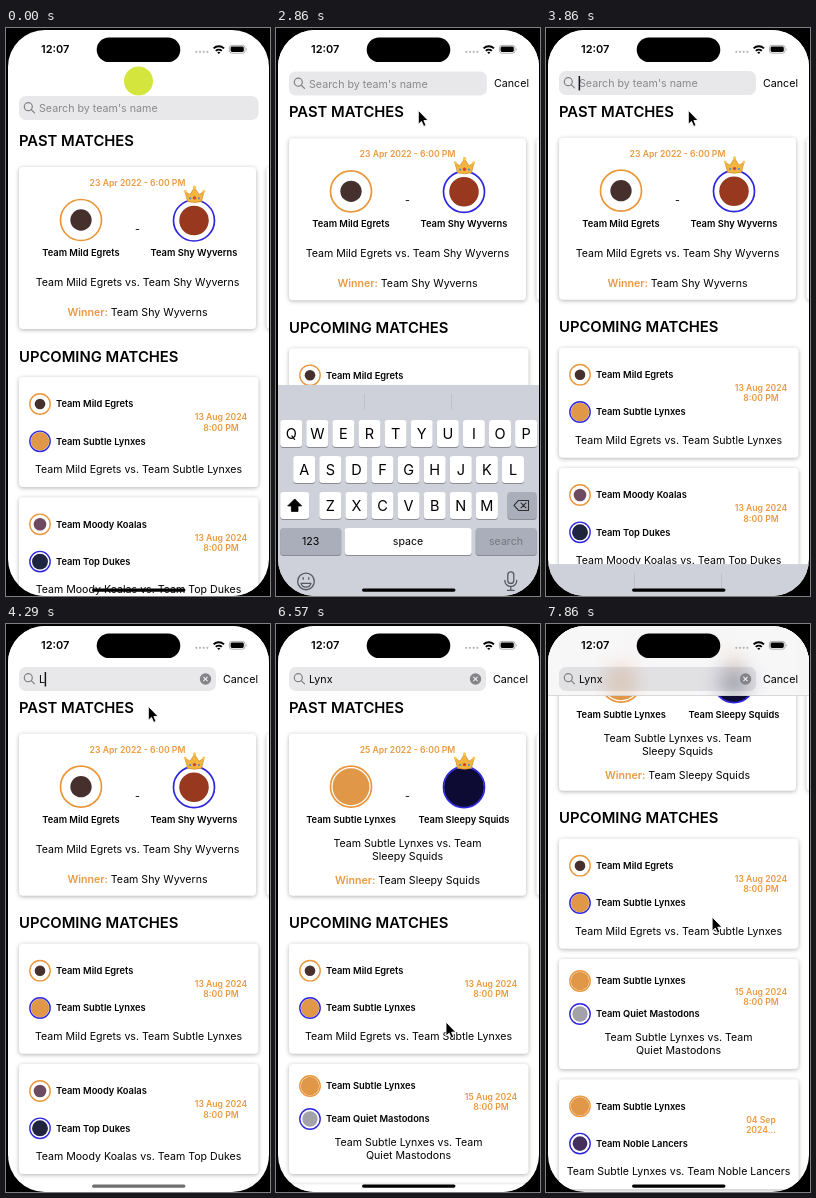
An HTML page for the animation above (8 s loop, 264 px wide and 568 px high).

```html
<!DOCTYPE html>
<html lang="en">
<head>
<meta charset="utf-8">
<title>Match search</title>
<style>
  html, body { margin: 0; width: 100%; height: 100%; overflow: hidden; background: #000; }
  svg { display: block; width: 100%; height: 100%; }
  text { font-family: Inter, Roboto, sans-serif; font-size: 10.6px; fill: #000; white-space: pre; }
  .mid { text-anchor: middle; }
  .title { font-size: 14.8px; font-weight: 600; }
  .name { font-size: 9.3px; font-weight: 600; }
  .date { font-size: 8.63px; font-weight: 600; fill: #ea9a41; }
  .win { font-weight: 600; fill: #ea9a41; }
  .field { font-size: 10.7px; }
  .key { font-size: 14.5px; }
  .card { fill: #fff; filter: drop-shadow(.6px 1.8px 2.3px rgba(0, 0, 0, .3)); }
</style>
</head>
<body>
<svg viewBox="0 0 264 568" preserveAspectRatio="none">
  <defs>
    <clipPath id="screen"><rect x="2" y="2" width="261" height="566" rx="37"/></clipPath>
    <clipPath id="top"><rect width="264" height="72"/></clipPath>
    <filter id="soft" x="-20%" y="-20%" width="140%" height="140%"><feGaussianBlur stdDeviation="8"/></filter>
  </defs>
  <rect width="264" height="568"/>
  <g clip-path="url(#screen)">
    <rect width="264" height="568" fill="#fff"/>
    <g id="list"><g id="all"></g><g id="found"></g></g>
    <g id="header" clip-path="url(#top)">
      <rect width="264" height="72" fill="#fff"/>
      <g id="glass">
        <g filter="url(#soft)"><use href="#list"/></g>
        <rect width="264" height="72" fill="#f5f5f6" opacity=".75"/>
        <rect y="71.5" width="264" height=".5" fill="#bbb"/>
      </g>
    </g>
    <circle id="logo" cx="132.5" cy="53" r="14.5" fill="#d4e53d"/>
    <g id="search">
      <rect id="bar" x="13" y="68" height="24" rx="6.6" fill="#767680" fill-opacity=".17"/>
      <g fill="none" stroke="#808085" stroke-width="1.2" stroke-linecap="round">
        <circle cx="22.3" cy="78.7" r="4"/><path d="M25.3 81.7l3.2 3.2"/>
      </g>
      <text id="hint" class="field" x="33" y="84" style="fill:#88888d">Search by team's name</text>
      <text id="query" class="field" x="33" y="84"></text>
      <rect id="caret" y="73" width="1.5" height="14.5" fill="#15151c"/>
      <g id="clear">
        <circle cx="199.5" cy="80" r="5.7" fill="#838388"/>
        <path d="M197.4 77.9l4.2 4.2m0-4.2l-4.2 4.2" stroke="#f0f0f0" stroke-width="1.1"/>
      </g>
    </g>
    <text id="cancel" class="field" y="59">Cancel</text>
    <g id="status">
      <text x="35" y="25" style="font-size:11px;font-weight:600">12:07</text>
      <rect x="90.7" y="9.5" width="83.6" height="24.6" rx="12.3"/>
      <g fill="#b5b5b8" id="dots"></g>
      <g fill="none" stroke="#000" stroke-width="1.9">
        <path d="M207.6 20.4a7.4 7.4 0 0 1 10.4 0"/><path d="M209.8 22.9a4.3 4.3 0 0 1 6 0"/>
      </g>
      <path d="M211.2 24.4a2.3 2.3 0 0 1 3.2 0l-1.6 1.7z"/>
      <rect x="223.4" y="17.4" width="15.6" height="7.8" rx="2.4" fill="none" stroke="#999" stroke-width=".8"/>
      <rect x="224.6" y="18.6" width="13.2" height="5.4" rx="1.4"/>
      <path d="M240 19.9q1.6 1.4 0 2.8z" fill="#999"/>
    </g>
    <g id="keys"></g>
    <rect id="home" x="86" y="560.4" width="93.5" height="3.4" rx="1.7"/>
  </g>
  <path id="pointer" d="M0 0v14l3.2-2.9 2.2 5 2.4-1-2.2-4.9h4.3z" stroke="#fff" stroke-width=".9" stroke-linejoin="round"/>
</svg>
<script>
const LOOP = 8000, ORANGE = '#ea963a', BLUE = '#2f27dd';
const $ = id => document.getElementById(id);

// name, badge colour, badge size relative to its ring
const team = (name, color, size) => ({ name, color, size });
const egrets = team('Mild Egrets', '#46302e', .52);
const wyverns = team('Shy Wyverns', '#97381f', .72);
const lynxes = team('Subtle Lynxes', '#e09848', .9);
const koalas = team('Moody Koalas', '#6d4a5f', .62);
const dukes = team('Top Dukes', '#20253f', .78);
const squids = team('Sleepy Squids', '#0d0b33', .98);
const mastodons = team('Quiet Mastodons', '#a2a2a8', .75);
const lancers = team('Noble Lancers', '#43305c', .72);

const text = (x, y, s, cls = '') => `<text x="${x}" y="${y}" class="${cls}">${s}</text>`;
const rect = (x, y, w, h, r, attrs) =>
  `<rect x="${x}" y="${y}" width="${w}" height="${h}" rx="${r}" ${attrs}/>`;
const card = (x, y, w, h) => rect(x, y, w, h, 4, 'class="card"');

const badge = (x, y, r, t, ring) =>
  `<circle cx="${x}" cy="${y}" r="${r * t.size}" fill="${t.color}"/>` +
  `<circle cx="${x}" cy="${y}" r="${r}" fill="none" stroke="${ring}" stroke-width="${r > 15 ? 1.7 : 1.4}"/>`;

const crown = (x, y) => `<g transform="translate(${x} ${y})">
  <path d="M-7 7L-9.5-3-4.5 0 0-7 4.5 0 9.5-3 7 7Q0 9 -7 7z" fill="#f2b640" stroke="#d08a25" stroke-width=".7"/>
  <g fill="#f6c95a"><circle cx="-9.3" cy="-3.2" r="1.5"/><circle cy="-7.3" r="1.7"/><circle cx="9.3" cy="-3.2" r="1.5"/></g>
  <circle cy="3.4" r="1.7" fill="#c9473d"/><circle cx="-4.4" cy="3.8" r="1.1" fill="#4a8fd0"/><circle cx="4.4" cy="3.8" r="1.1" fill="#4a8fd0"/></g>`;

// "A vs. B", on one line or broken after the second "Team"
function versus(x, y, a, b, wrap, gap) {
  const head = `Team ${a.name} vs. Team`;
  return wrap
    ? text(x, y - gap, head, 'mid') + text(x, y - gap + 13.5, b.name, 'mid')
    : text(x, y, `${head} ${b.name}`, 'mid');
}

function pastCard(date, a, b, wrap) {
  return card(13, 139, 237, 162) + card(260.5, 139, 237, 162) +
    text(131.5, 158, date, 'date mid') +
    badge(75, 192, 20.5, a, ORANGE) + badge(188, 192.5, 20.5, b, BLUE) + crown(188.5, 166.5) +
    text(131.5, 205, '-', 'mid') +
    text(75, 228, 'Team ' + a.name, 'name mid') + text(188, 228, 'Team ' + b.name, 'name mid') +
    versus(131.5, 258, a, b, wrap, 6) +
    `<text x="131.5" y="${wrap ? 289 : 288}" class="mid"><tspan class="win">Winner:</tspan> Team ${b.name}</text>`;
}

function gameCard(i, [a, b, day, hour, wrap]) {
  const y = 349 + i * 120.3, first = y + (wrap ? 22 : 27), second = first + (wrap ? 33 : 37.3);
  const when = y + (wrap ? 36 : 43.3);
  return card(13, y, 239.5, 110) +
    badge(34, first, 10.2, a, ORANGE) + badge(34, second, 10.2, b, BLUE) +
    text(50, first + 3.4, 'Team ' + a.name, 'name') + text(50, second + 3.4, 'Team ' + b.name, 'name') +
    text(215, when, day, 'date mid') + text(215, when + 10.3, hour, 'date mid') +
    versus(132.5, y + 96, a, b, wrap, 14);
}

const page = (past, games) =>
  text(13, 118, 'PAST MATCHES', 'title') + past +
  text(13, 333.5, 'UPCOMING MATCHES', 'title') + games.map((g, i) => gameCard(i, g)).join('');

const opener = [egrets, lynxes, '13 Aug 2024', '8:00 PM'];
$('all').innerHTML = page(pastCard('23 Apr 2022 - 6:00 PM', egrets, wyverns),
  [opener, [koalas, dukes, '13 Aug 2024', '8:00 PM']]);
$('found').innerHTML = page(pastCard('25 Apr 2022 - 6:00 PM', lynxes, squids, true),
  [opener, [lynxes, mastodons, '15 Aug 2024', '8:00 PM', true], [lynxes, lancers, '04 Sep', '2024...']]);
$('dots').innerHTML = [0, 1, 2, 3].map(i => `<circle cx="${190.3 + i * 3.7}" cy="23.8" r="1.1"/>`).join('');

function keyboard() {
  const GREY = '#a9aeba';
  const key = (x, y, w, fill) =>
    rect(x, y + 1, w, 27, 3.3, 'fill="#898c92"') + rect(x, y, w, 27, 3.3, `fill="${fill}"`);
  let out = rect(0, 348, 264, 222, 0, 'fill="#ced1d9"') +
    '<path d="M88.5 357v16M175.5 357v16" stroke="#b9bcc5" stroke-width=".8"/>';
  [['QWERTYUIOP', 15.2], ['ASDFGHJKL', 28.2], ['ZXCVBNM', 54.3]].forEach(([row, x0], r) => {
    const y = 383 + r * 36;
    [...row].forEach((c, i) => {
      const x = x0 + i * 26.1;
      out += key(x - 11, y, 22, '#fff') + text(x, y + 18.8, c, 'key mid');
    });
  });
  out += key(4.2, 455, 29, '#fff') + key(231.5, 455, 29, GREY) +
    key(4.2, 491, 61, GREY) + key(68.7, 491, 127, '#fff') + key(199.7, 491, 61, GREY) +
    text(34.7, 508.5, '123', 'mid') + text(132, 508.3, 'space', 'mid') +
    '<text x="230" y="508.3" class="mid" style="fill:#73767e">search</text>' +
    '<path d="M18.7 462l7 7h-3.7v5.5h-6.6V469h-3.7z" stroke="#000" stroke-width=".8" stroke-linejoin="round"/>' +
    `<g fill="none" stroke="#2b2d31" stroke-width="1.1" stroke-linecap="round" stroke-linejoin="round">
      <path d="M238 468.5l4.5-5h10v10h-10zM245 466l5 5m0-5l-5 5"/>
      <g stroke="#55585f" stroke-width="1.3"><circle cx="30" cy="544.5" r="8.3"/>
      <path d="M25 546.5a5.2 5.2 0 0 0 10 0z"/><path d="M27.2 540.6v1.6M32.8 540.6v1.6"/>
      <rect x="231.8" y="535" width="6" height="11.5" rx="3"/>
      <path d="M228.8 543.5a6 6 0 0 0 12 0M234.8 549.5v4M231.5 553.5h6.6"/></g></g>`;
  return out;
}
$('keys').innerHTML = keyboard();

const ramp = (t, a, b) => Math.min(1, Math.max(0, (t - a) / (b - a)));
const easeOut = p => 1 - (1 - p) ** 3;
const easeInOut = p => p * p * (3 - 2 * p);
const mix = (a, b, p) => a + (b - a) * p;
const move = (el, x, y) => el.setAttribute('transform', `translate(${x} ${y})`);
const show = (id, on) => $(id).style.display = on ? '' : 'none';

function caretOn(t) {
  if (t < 2000) return false;
  if (t < 3600) return (t - 2000) % 1060 < 530;
  return t < 5480 || (t - 4950) % 1060 < 530;
}

function pointerAt(t, scroll) {
  if (t < 5000) {
    const p = easeOut(ramp(t, 290, 1500));
    return [mix(152, 142.3, p), mix(-18, 82.3, p)];
  }
  const p = easeInOut(ramp(t, 5100, 6250));
  return [mix(142.3, 170, p) - scroll * .037, mix(82.3, 398, p) - scroll];
}

function draw(t) {
  const focus = easeInOut(ramp(t, 2440, 2900));
  const keys = easeOut(ramp(t, 2500, 3050)) - easeOut(ramp(t, 3600, 4150));
  const scroll = 105 * ramp(t, 6500, 7860) ** 3.67;
  const typed = [4200, 4380, 4620, 5080].filter(at => t >= at).length;

  move($('list'), 0, -29.3 * focus - scroll);
  show('all', typed < 2);
  show('found', typed >= 2);
  $('glass').style.opacity = ramp(scroll, 0, 10);
  show('header', focus > 0);

  $('logo').style.opacity = 1 - ramp(focus, 0, .7);
  move($('logo'), 0, -12 * focus);
  move($('search'), 0, -25 * focus);
  $('bar').setAttribute('width', mix(239.5, 197, focus));
  $('cancel').setAttribute('x', mix(265, 217, focus));
  $('cancel').style.opacity = focus;

  $('query').textContent = 'Lynx'.slice(0, typed);
  show('hint', !typed);
  show('clear', typed);
  show('caret', caretOn(t));
  $('caret').setAttribute('x', 32.6 + (typed ? $('query').getComputedTextLength() : 0));

  show('keys', keys > 0);
  move($('keys'), 0, 220 * (1 - keys));
  $('home').setAttribute('fill', t > 4150 && t < 6500 ? '#6e6e70' : '#000');

  show('pointer', t >= 290);
  move($('pointer'), ...pointerAt(t, scroll));
}

const start = performance.now();
function tick() {
  draw((performance.now() - start) % LOOP);
  requestAnimationFrame(tick);
}
tick();
</script>
</body>
</html>
```
